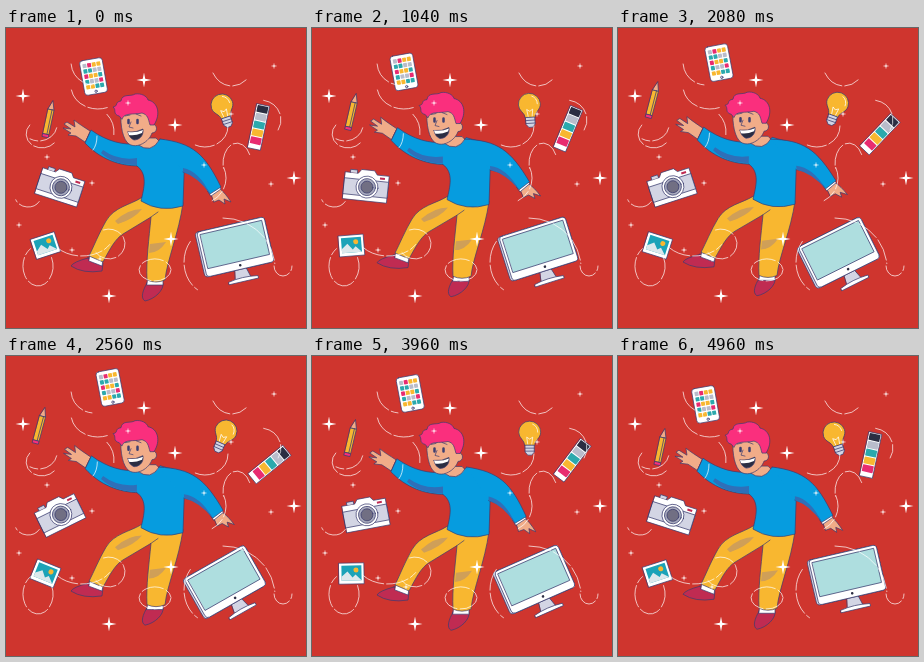
These frames come from a looping animation (300 by 300 pixels, 5040 ms). An HTML page:

```html
<!DOCTYPE html>
<html lang="en">
<head>
<meta charset="utf-8">
<title>Floating creative tools</title>
<style>
html, body { margin: 0; width: 100%; height: 100%; overflow: hidden; background: #cf352e; }
svg { display: block; width: 100%; height: 100%; stroke: #3b3d70; stroke-width: .7; stroke-linejoin: round; stroke-linecap: round; }
.white { fill: #fff; } .lilac { fill: #d3d5e4; } .dark { fill: #2b2d42; }
.gold { fill: #f8b730; } .blue { fill: #069cdf; } .skin { fill: #f1ac88; }
.pink { fill: #fa2f7d; } .teal { fill: #aededf; } .shoe { fill: #c02b52; }
.shade { fill: #cf9f58; stroke: none; } .deep { fill: #2f6fb8; stroke: none; }
.line { fill: none; } .flat { stroke: none; }
#swirls { fill: none; stroke: #fff; stroke-width: .7; stroke-dasharray: 22 3; }
#stars { fill: #fff; stroke: none; }
</style>
</head>
<body>
<svg viewBox="0 0 300 300">
  <g id="phone">
    <rect class="white" x="-11.500" y="-17.500" width="23" height="35" rx="3"/>
    <g id="apps" class="flat"></g>
    <circle class="lilac" cy="15" r="1.200"/>
  </g>
  <g id="pencil">
    <path class="skin" d="M0-19 3-10H-3Z"/>
    <path class="gold" d="M-3-10H3V15H-3Z"/>
    <path class="line" d="M1-10V15"/>
    <path class="pink" d="M-3 15H3V18H-3Z"/>
  </g>
  <g id="bulb">
    <path class="gold" d="M-5 13C-5 8-11 6-11 0A11 11 0 0 1 11 0C11 6 5 8 5 13Z"/>
    <path class="line" stroke="#fff" d="M3-8Q8-6 8 0M-2 12-3 5 0 7 3 5 2 12"/>
    <path class="lilac" d="M-4.500 13H4.500V20L2 23H-2L-4.500 20Z"/>
    <path class="line" d="M-4.500 16H4.500M-4.500 19H4.500"/>
  </g>
  <g id="swatch">
    <rect class="white" x="-6.500" y="-45" width="13" height="45"/>
    <g id="chips" class="flat"></g>
  </g>
  <g id="camera">
    <path class="white" d="M-22-13H-9L-6-17H7L10-13H22V14H-22Z"/>
    <path class="lilac" d="M-22-7H22V9H-22ZM-17-13V-16H-10V-13"/>
    <path class="shoe flat" d="M13-11H18V-9H13Z"/>
    <circle class="white" cx="1" r="11"/>
    <circle fill="#a9abbd" cx="1" r="8.500"/>
    <circle fill="#716f83" cx="1" r="6"/>
  </g>
  <g id="photo">
    <rect class="white" x="-12.500" y="-10.500" width="25" height="21"/>
    <path class="flat" fill="#1ba3b8" d="M-10-8H10V7H-10Z"/>
    <circle class="gold flat" cx="4.500" cy="-3.500" r="2.500"/>
    <path class="flat" fill="#dce8ec" d="M-10 7V3L-4-2 1 4 4 1 10 7Z"/>
  </g>
  <g id="monitor">
    <path class="lilac" d="M-5 22H6L9 33H-7Z"/>
    <path class="white" d="M-14 33Q0 30 16 33V35.500H-14Z"/>
    <rect class="lilac" x="-36" y="-23" width="71" height="46" rx="3.500"/>
    <rect class="white" x="-34" y="-23" width="69" height="46" rx="3.500"/>
    <rect class="teal" x="-31" y="-20" width="63" height="35"/>
    <circle class="dark flat" cx="1" cy="19" r="1.300"/>
  </g>

  <g id="legs">
    <path class="shoe" d="M82 230 97 235 96 243Q77 246 65 238 67 234 82 230Z"/>
    <path class="shoe" d="M141 255 157 255C158 262 149 271 139 273 134 270 137 262 141 255Z"/>
    <path class="white" d="M84 227 97 232 96 238 83 233ZM142 250H157V257H141Z"/>
    <path class="gold" d="M135 170C124 177 108 179 100 193 93 205 88 218 83 228L97 234C104 221 109 211 117 206L145 189C143 211 140 232 141 252Q150 256 159 252C161 232 173 205 177 175Z"/>
    <path class="shade" d="M109 193Q122 181 136 181 128 191 112 196ZM144 216 160 214Q153 225 143 225Z"/>
    <path class="line" d="M145 189 152 184"/>
  </g>
  <g id="torso">
    <g id="reach">
      <path class="skin" d="M84 103C78 99 73 96 68 92L69 99 61 94 58 96 65 101 57 100 65 105 62 107 70 108 79 114Z"/>
      <path class="blue" d="M132 116C117 117 102 114 85 102L79 115C94 131 113 138 133 138"/>
      <path class="deep" d="M97 122Q112 133 131 130V137Q108 137 95 125Z"/>
      <path class="line" stroke="#fff" d="M91 108Q91 117 87 122"/>
    </g>
    <path class="skin" d="M132 110H150L154 114Q145 126 132 118Z"/>
    <path class="blue" d="M131 116Q145 127 154 111L179 118 177 178Q154 185 135 173C138 160 142 146 131 138"/>
    <g id="trail">
      <path class="skin" d="M205 165 213 160C218 164 221 168 225 174L218 171 219 176 213 172 208 174Z"/>
      <path class="white" d="M202 163 213 157 215 161 205 168Z"/>
      <path class="blue" d="M154 111C187 115 199 126 215 159L204 166C196 153 187 146 177 144"/>
      <path class="deep" d="M177 140Q193 143 204 166 192 149 177 144Z"/>
    </g>
    <path class="skin" d="M115 84C114 98 117 112 123 116 131 121 143 114 146 105 152 105 152 96 146 96L144 82Z"/>
    <path class="pink" d="M113 88C106 86 111 82 107 79 113 78 108 74 115 73 116 65 125 69 129 66 135 65 141 68 142 72 152 74 155 86 148 97L144 97C142 90 142 87 136 85 128 87 118 84 116 91Z"/>
    <path class="line" d="M119 88 124 87M130 86 135 88M125 94 123 99 127 100"/>
    <path class="line" stroke-width="2.500" d="M122.500 92V95M131.500 92V95"/>
    <path class="dark" d="M122 104Q130 105 137 101C138 109 132 112 128 112Q123 110 122 104Z"/>
    <path class="white flat" d="M122 104Q130 105 137 102L136 105Q129 108 123 107Z"/>
  </g>
  <path id="swirls"/>
  <path id="stars"/>
</svg>
<script>
const LOOP = 5040, STEP = 40, EARLY = 2650, LATE = 3120;
const $ = id => document.getElementById(id);
const place = (id, transform) => $(id).setAttribute('transform', transform);

// Tools drift by (dx, dy) and turn by `swing` degrees until `peak`, then return.
const tools = {
  phone:   { x: 87.5, y: 48.5, dx: 18,  dy: -18.5, tilt: -10, swing: -1,  peak: LATE },
  pencil:  { x: 43,   y: 91.5, dx: -9,  dy: -21.5, tilt: 12,  swing: 3,   peak: EARLY },
  bulb:    { x: 216,  y: 77,   dx: 4,   dy: -2,    tilt: -18, swing: 42,  peak: EARLY },
  swatch:  { x: 248,  y: 121,  dx: -2,  dy: 2,     tilt: 12,  swing: 42,  peak: LATE },
  camera:  { x: 54,   y: 159,  dx: 0,   dy: 0,     tilt: 18,  swing: -48, peak: LATE },
  photo:   { x: 39.5, y: 217.5, dx: 0,  dy: 0,     tilt: -18, swing: 40,  peak: EARLY },
  monitor: { x: 229,  y: 219,  dx: -11, dy: 7.5,   tilt: -13, swing: -18, peak: LATE }
};

const tile = (x, y, w, h, fill) => `<rect x="${x}" y="${y}" width="${w}" height="${h}" rx=".6" fill="${fill}"/>`;
const palette = ['#2b2d42', '#b9bccb', '#2ba9ad', '#f8b730', '#e82b70'];
for (let i = 0; i < 20; i++)
  $('apps').innerHTML += tile(-9 + i % 4 * 4.7, -14 + (i >> 2) * 5.4, 3.9, 4.2, palette[1 + i * 3 % 7 % 4]);
$('chips').innerHTML = palette.map((fill, i) => tile(-5.5, -44 + i * 8, 11, 7, fill)).join('');

// Elliptical stroke from angle `a` through `sweep` degrees.
function arc([cx, cy, rx, ry, a, sweep]) {
  const at = deg => [cx + rx * Math.cos(deg * Math.PI / 180), cy + ry * Math.sin(deg * Math.PI / 180)];
  return `M${at(a)}A${rx} ${ry} 0 ${+(Math.abs(sweep) > 180)} ${+(sweep > 0)} ${at(a + sweep)}`;
}
$('swirls').setAttribute('d', [
  [88, 34, 23, 23, 175, -80], [92, 58, 27, 23, 170, -100], [84, 104, 24, 25, -45, 55],
  [33, 97, 18, 16, 10, 110], [36, 106, 16, 14, 40, 180],
  [22, 168, 13, 11, 30, 130], [32, 238, 15, 20, -25, 265], [76, 205, 32, 23, 140, -110],
  [103, 216, 16, 15, 145, -255], [149, 242, 16, 11, 0, 355],
  [226, 32, 22, 26, 150, -100], [199, 98, 23, 21, 0, 115], [231, 135, 14, 20, -25, -170],
  [196, 150, 24, 25, -25, 90], [254, 92, 21, 20, -80, 110],
  [217, 240, 52, 50, -90, 85], [277, 238, 9, 10, 180, -180], [205, 234, 27, 32, -140, -100]
].map(arc).join(''));

const star = (r, w) => ([x, y]) =>
  `M${x} ${y - r}l${w} ${r - w} ${r - w} ${w} ${w - r} ${w} ${-w} ${r - w} ${-w} ${w - r} ${w - r} ${-w} ${r - w} ${-w}z`;
const bright = [[17, 68], [138, 52], [169, 97], [288, 150], [103, 268], [165, 211]];
const faint = [[41, 129], [86, 155], [13, 197], [66, 222], [122, 75], [268, 38], [225, 86], [198, 137], [265, 156], [94, 231]];
$('stars').setAttribute('d', bright.map(star(7.5, 1.2)).join('') + faint.map(star(3.5, .5)).join(''));

function draw(t) {
  for (const id in tools) {
    const { x, y, dx, dy, tilt, swing, peak } = tools[id];
    const phase = t < peak ? t / peak : (LOOP - t) / (LOOP - peak);
    const p = (1 - Math.cos(Math.PI * phase)) / 2;
    place(id, `translate(${x + dx * p} ${y + dy * p}) rotate(${tilt + swing * p})`);
  }
  const sway = Math.sin((t - 480) / LOOP * 2 * Math.PI) + .56;
  const lift = -1.2 * sway;
  place('torso', `translate(0 ${lift})`);
  place('reach', `rotate(${sway} 131 126)`);
  place('trail', `rotate(${-sway * 4} 172 128)`);
  place('legs', `translate(0 ${175 + lift}) scale(1 ${1 - sway * .024}) translate(0 -175)`);
}

function tick(now) {
  const t = now % LOOP;
  draw(Math.min(t - t % STEP, LOOP - 2 * STEP));
  requestAnimationFrame(tick);
}
draw(0);
requestAnimationFrame(tick);
</script>
</body>
</html>
```
